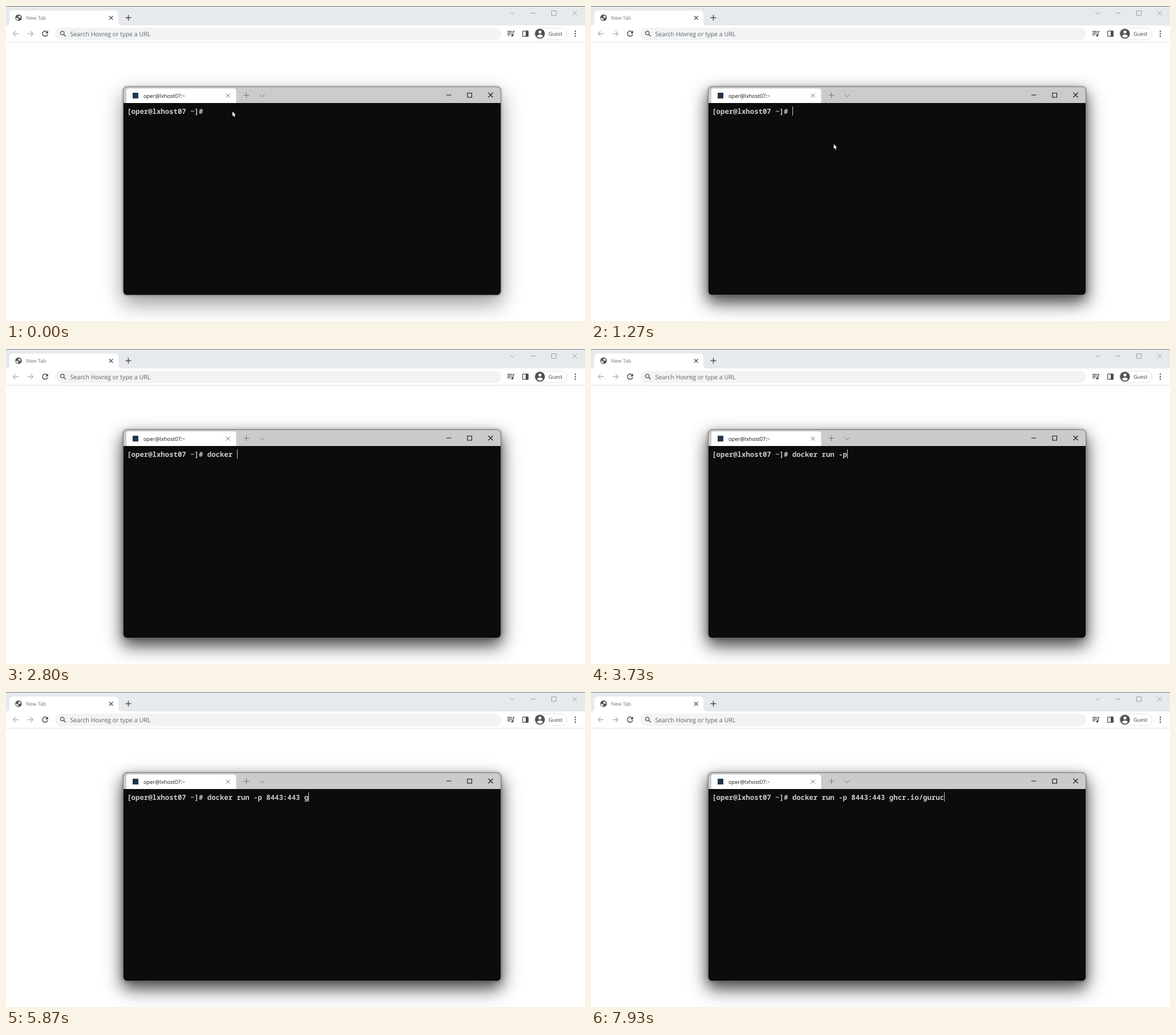
Animation, 1015 px wide and 552 px high, one loop 8000 ms. Source, as an HTML page:

```html
<!DOCTYPE html>
<html lang="en">
<head>
<meta charset="utf-8">
<title>Terminal typing</title>
<style>
  html, body { margin: 0; width: 100%; height: 100%; overflow: hidden; background: #fff; }
  svg { position: absolute; left: 0; top: 0; }
  text { font-family: "Open Sans", "Noto Sans", sans-serif; text-rendering: geometricPrecision; white-space: pre; }
  #line { font: 600 12.345px "Noto Sans Mono", monospace; }
  #shadow { position: absolute; left: 205px; top: 141px; width: 663px; height: 366px; border-radius: 7px;
    box-shadow: 0 14px 36px rgba(0,0,0,.42), 0 0 4px rgba(0,0,0,.3); }
  #shadow.focus { box-shadow: 0 14px 36px rgba(0,0,0,.42), 0 0 4px rgba(0,0,0,.3), 0 10px 24px rgba(0,0,0,.5); }
</style>
</head>
<body>
<div id="shadow"></div>
<svg width="1015" height="552" viewBox="0 0 1015 552" fill="none">
  <!-- Browser tab strip -->
  <path fill="#e7eaed" d="M0 0H1015V34H0Z"/>
  <path fill="#74777b" d="M0 0H1015V1H0Z"/>
  <path fill="#fff" d="M0 34Q6 34 6 28V15Q6 8 13 8H190Q197 8 197 15V28Q197 34 203 34Z"/>
  <circle cx="22" cy="20.5" r="5.7" fill="#505357"/>
  <path fill="#fff" d="M17.5 20.5L21 21.5 22 23.5 21 25Q17.5 24 17.5 20.5ZM22 16.5L25 17.5 26 20 23.5 21 21.5 19.5Z"/>
  <text x="35" y="24" font-size="8.9" fill="#72757a">New Tab</text>
  <path stroke="#4b4e52" stroke-width="1.3" d="M181 17.5L187.5 24M187.5 17.5L181 24"/>
  <path stroke="#4b4e52" stroke-width="1.5" d="M209.5 20.5H219.5M214.5 15.5V25.5"/>
  <path stroke="#999ca0" d="M884 10.5L888 14.5 892 10.5M920 12.5H928.5M956.500 8.500H964.500V16.500H956.500ZM993 8.500L1001 16.500M1001 8.500L993 16.500"/>

  <!-- Browser toolbar -->
  <path fill="#dfe1e4" d="M0 63H1015V64H0Z"/>
  <path stroke="#b3b5b8" stroke-width="1.300" d="M22.500 48.500H12.500M17 44L12.500 48.500 17 53M37.500 48.500H47.500M43 44L47.500 48.500 43 53"/>
  <path stroke="#4b4e52" stroke-width="1.500" d="M72.300 45.800A4.600 4.600 0 1 0 73 49.500"/>
  <path fill="#4b4e52" d="M73.800 43V48H68.800Z"/>
  <rect x="86" y="38" width="782" height="22" rx="11" fill="#f1f3f4"/>
  <g stroke="#4b4e52" stroke-width="1.300">
    <circle cx="98.800" cy="47.300" r="3.200"/>
    <path d="M101 49.500L104.700 53.200"/>
  </g>
  <text x="112.500" y="53" font-size="10.650" fill="#5f6368">Search Hovreg or type a URL</text>
  <path stroke="#4b4e52" stroke-width="1.300" d="M879 44.500H887M879 47.500H887M879 50.500H884M889 51V44.500H891.500"/>
  <circle cx="887.500" cy="51.500" r="1.900" fill="#4b4e52"/>
  <rect x="905.600" y="43.800" width="9.800" height="9.400" rx="1" stroke="#4b4e52" stroke-width="1.300"/>
  <path fill="#4b4e52" d="M911 43.500H915.500V53.500H911Z"/>
  <rect x="925.500" y="38.500" width="58" height="20.500" rx="10.200" stroke="#dfe1e4"/>
  <circle cx="936" cy="48.500" r="8.700" fill="#4f5257"/>
  <circle cx="936" cy="45.600" r="2.600" fill="#fff"/>
  <path fill="#fff" d="M930.800 53Q932 50 936 50T941.200 53Q939 55.400 936 55.400T930.800 53Z"/>
  <text x="951" y="52" font-size="8.970" fill="#3c4043">Guest</text>
  <path stroke="#4b4e52" stroke-width="2.400" stroke-linecap="round" stroke-dasharray="0 4.200" d="M998 44.300V53"/>

  <!-- Terminal window -->
  <rect x="205.500" y="141.500" width="662" height="365" rx="6.500" fill="#0c0c0c"/>
  <path fill="#cbcbcb" d="M206 170V148Q206 142 212 142H861Q867 142 867 148V170Z"/>
  <rect x="205.500" y="141.500" width="662" height="365" rx="6.500" stroke="#777" stroke-opacity=".7"/>
  <path fill="#fff" d="M211 170V149Q211 144.500 215.500 144.500H399Q403.500 144.500 403.500 149V170Z"/>
  <rect x="222" y="152" width="10" height="10" fill="#22364b"/>
  <text x="241" y="161" font-size="9.270" fill="#111">oper@lxhost07:~</text>
  <path stroke="#777" d="M385.500 153.500L392.500 160.500M392.500 153.500L385.500 160.500M416.500 156.500H426.500M421.500 151.500V161.500M444.500 154.800L449 159.300 453.500 154.800"/>
  <path stroke="#111" stroke-width="1.100" d="M772 156H780.500M809 152.500H816.500V160H809ZM845.500 152L853.500 160M853.500 152L845.500 160"/>
  <text id="line" x="212.200" y="188.500" fill="#ccc"></text>
  <rect id="caret" y="176" width="1" height="16" fill="#ccc"/>
  <path id="pointer" fill="#fff" d="M0 0V8L1.900 6.400 3.300 9.400 4.700 8.800 3.400 5.900H5.700Z"/>
</svg>
<script>
const LOOP = 8000, TICK = 1000 / 15, CHAR = 7.407;
const PROMPT = "[oper@lxhost07 ~]# ";
const COMMAND = "docker run -p 8443:443 ghcr.io/guruc";
// Time of each key press, in ms
const KEYS = [
  2200, 2330, 2470, 2530, 2600, 2730, 2800,
  2870, 3000, 3200, 3270, 3400, 3730, 3930,
  4130, 4270, 4400, 4530, 4730, 4930, 5070, 5200, 5530,
  5870, 6070, 6330, 6530, 7000, 7200, 7270, 7470, 7600, 7670, 7730, 7870, 7930
];
const FOCUS = 1270, BLINK = 530, HIDE_POINTER = 2270;

const [shadow, line, caret, pointer] =
  ["shadow", "line", "caret", "pointer"].map(id => document.getElementById(id));
const show = (el, on) => el.setAttribute("visibility", on ? "visible" : "hidden");

function draw(t) {
  const typed = KEYS.filter(key => key <= t).length;
  line.textContent = PROMPT + COMMAND.slice(0, typed);
  caret.setAttribute("x", Math.round(353 + typed * CHAR - 0.3));

  const lastInput = typed ? KEYS[typed - 1] : FOCUS;
  show(caret, t >= FOCUS && t - lastInput < BLINK);
  shadow.className = t >= FOCUS ? "focus" : "";

  const p = Math.min(Math.floor((t + 4) / TICK) / 8, 1);
  const ease = p * p * (3 - 2 * p);
  pointer.setAttribute("transform", `translate(${397 + 28.5 * ease} ${185 + 57 * ease})`);
  show(pointer, t < HIDE_POINTER);
}

function frame() {
  draw(performance.now() % LOOP);
  requestAnimationFrame(frame);
}
frame();
</script>
</body>
</html>
```
